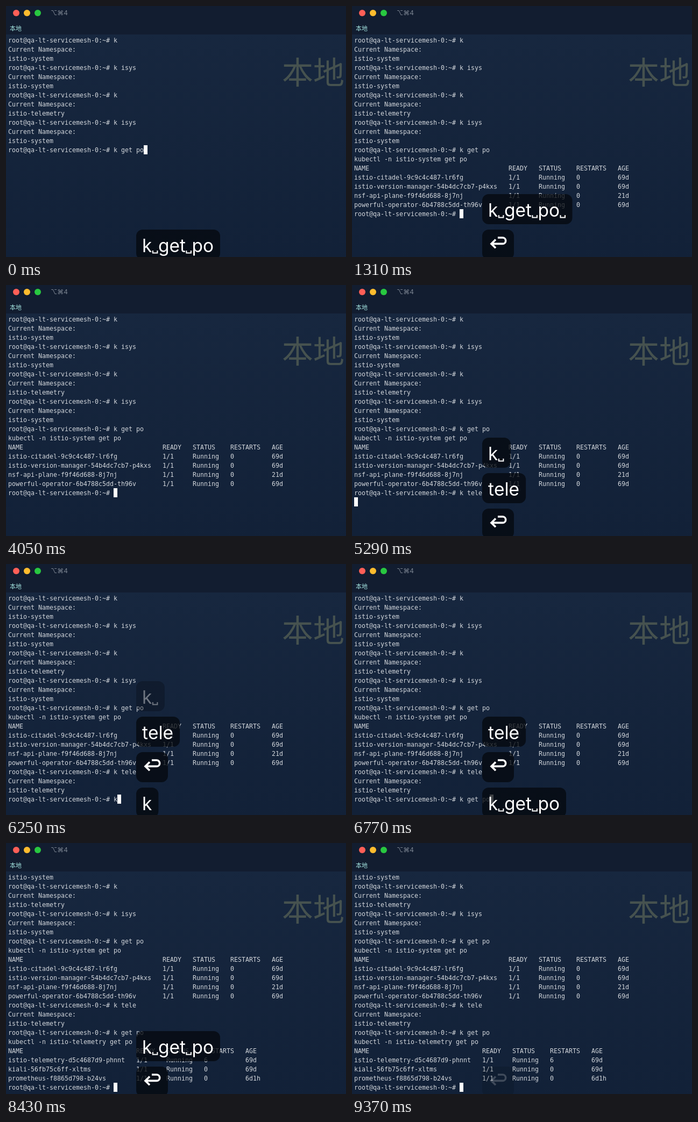
Recreate the animation shown at these times as an HTML page with a canvas. Size 632x467 px, loop 9970 ms.

```html
<!DOCTYPE html>
<html lang="zh-CN">
<head>
<meta charset="utf-8">
<title>Terminal</title>
<style>
html, body { margin: 0; width: 100%; height: 100%; overflow: hidden; background: #132239; }
canvas { display: block; }
</style>
</head>
<body>
<canvas id="stage" width="632" height="467"></canvas>
<script>
const ctx = document.getElementById('stage').getContext('2d');
const LOOP = 9970, ROWS = 24, PITCH = 17;
const MONO = '11.63px "DejaVu Sans Mono", monospace';
const SANS = 'Inter, "DejaVu Sans", sans-serif';
const CJK = '"Noto Sans CJK SC", "Noto Sans CJK JP", "Noto Sans CJK", sans-serif';
const PROMPT = 'root@qa-lt-servicemesh-0:~# ';
const ENTER = '\n';

const table = (nameWidth, rows) =>
  [['NAME', 'READY', 'STATUS', 'RESTARTS', 'AGE'],
    ...rows.map(([name, restarts, age]) => [name, '1/1', 'Running', restarts, age])]
    .map(r => r[0].padEnd(nameWidth) + r[1].padEnd(8) + r[2].padEnd(10) + r[3].padEnd(11) + r[4]);
const namespace = (command, name) => [PROMPT + command, 'Current Namespace:', name];

const lines = [
  ...namespace('k', 'istio-system'),
  ...namespace('k isys', 'istio-system'),
  ...namespace('k', 'istio-telemetry'),
  ...namespace('k isys', 'istio-system'),
  PROMPT + 'k get po',
  'kubectl -n istio-system get po',
  ...table(41, [
    ['istio-citadel-9c9c4c487-lr6fg', '0', '69d'],
    ['istio-version-manager-54b4dc7cb7-p4kxs', '0', '69d'],
    ['nsf-api-plane-f9f46d688-8j7nj', '0', '21d'],
    ['powerful-operator-6b4788c5dd-th96v', '0', '69d']]),
  ...namespace('k tele', 'istio-telemetry'),
  PROMPT + 'k get po',
  'kubectl -n istio-telemetry get po',
  ...table(34, [
    ['istio-telemetry-d5c4687d9-phnnt', '6', '69d'],
    ['kiali-56fb75c6ff-xltms', '0', '69d'],
    ['prometheus-f8865d798-b24vs', '0', '6d1h']])
];

// text, first key time, ms per key, fade start, removal
const keys = [
  ['k get po ', -840, 120, 1550, 1780],
  [ENTER, 180, 1, 2130, 4050],
  ['k ', 4110, 50, 6130, 6370],
  ['tele', 4580, 96, 6830, 7060],
  [ENTER, 5110, 1, 6890, 7110],
  ['k get po', 6190, 82, 8670, 9200],
  [ENTER, 7230, 1, 9200, LOOP]
];

// time, finished lines, keys typed after the prompt (none: bare cursor)
const screens = [
  [0, 12, [0]], [180, 13], [240, 14], [300, 19], [1310, 19, [2, 3]],
  [5290, 20], [6130, 22, [5]], [7230, 23], [7350, 24], [8430, 28, []]
];

function typed(i, t) {
  const [text, born, step] = keys[i];
  return text.slice(0, Math.max(0, Math.floor((t - born) / step) + 1));
}

function write(text, x, y, font, color) {
  ctx.font = font;
  ctx.fillStyle = color;
  ctx.fillText(text, x, y);
}

function drawWindow() {
  const shade = ctx.createLinearGradient(0, 53, 0, 467);
  shade.addColorStop(0, '#17273f');
  shade.addColorStop(1, '#122138');
  ctx.fillStyle = shade;
  ctx.fillRect(0, 0, 632, 467);
  ctx.fillStyle = '#121d30';
  ctx.fillRect(0, 0, 632, 53);
  ['#ff5f57', '#febc2e', '#28c840'].forEach((color, i) => {
    ctx.fillStyle = color;
    ctx.beginPath();
    ctx.arc(19 + 20 * i, 13, 6, 0, 7);
    ctx.fill();
  });
  write('⌥⌘4', 83, 17, '12px ' + SANS, '#7b8491');
  write('本地', 7, 46, '11px ' + CJK, '#a5e6e2');
  write('本地', 513, 145, '58px ' + CJK, '#46524f');
}

function drawText(t) {
  const [, count, input] = screens.findLast(s => s[0] <= t);
  const last = input ? PROMPT + input.map(i => typed(i, t)).join('') : '';
  const rows = [...lines.slice(0, count), last].slice(-ROWS);
  rows.forEach((row, i) => write(row, 4, 68 + i * PITCH, MONO, '#d3d7dc'));
  ctx.fillStyle = '#fff';
  ctx.fillRect(4 + Math.round(ctx.measureText(last).width), 55 + (rows.length - 1) * PITCH, 7, 17);
}

function drawKey(text, y, alpha) {
  ctx.font = '33.5px ' + SANS;
  const widths = [...text].map(c => c === ENTER ? 36 : c === ' ' ? 11.5 : ctx.measureText(c).width);
  ctx.globalAlpha = alpha;
  ctx.fillStyle = 'rgba(5, 9, 14, .76)';
  ctx.beginPath();
  ctx.roundRect(242, y, widths.reduce((a, b) => a + b, 23), 56, 12);
  ctx.fill();
  ctx.fillStyle = ctx.strokeStyle = '#fff';
  let x = 253;
  [...text].forEach((c, i) => {
    if (c === ENTER) {
      ctx.lineWidth = 3.6;
      ctx.stroke(new Path2D(`M271 ${y + 15}h9a5.6 5.6 0 0 1 0 11.4H259M267 ${y + 18.5}l-8 7.9l8 7.9`));
    } else if (c === ' ') {
      ctx.lineWidth = 2;
      ctx.stroke(new Path2D(`M${x + 1.5} ${y + 39}v4.5h8.5v-4.5`));
    } else ctx.fillText(c, x, y + 42);
    x += widths[i];
  });
  ctx.globalAlpha = 1;
}

function drawKeys(t) {
  keys.forEach(([, born, , fade, gone], i) => {
    if (t < born || t >= gone) return;
    const newer = keys.filter((k, j) => j > i && k[1] <= t).length;
    const step = t < fade ? 0 : Math.floor((t - fade) / 56) + 1;
    drawKey(typed(i, t), 416 - 66 * newer, Math.max(.2, 1 - .2 * step));
  });
}

const start = performance.now();
function frame() {
  const t = (performance.now() - start) % LOOP;
  drawWindow();
  drawText(t);
  drawKeys(t);
  requestAnimationFrame(frame);
}
frame();
</script>
</body>
</html>
```
